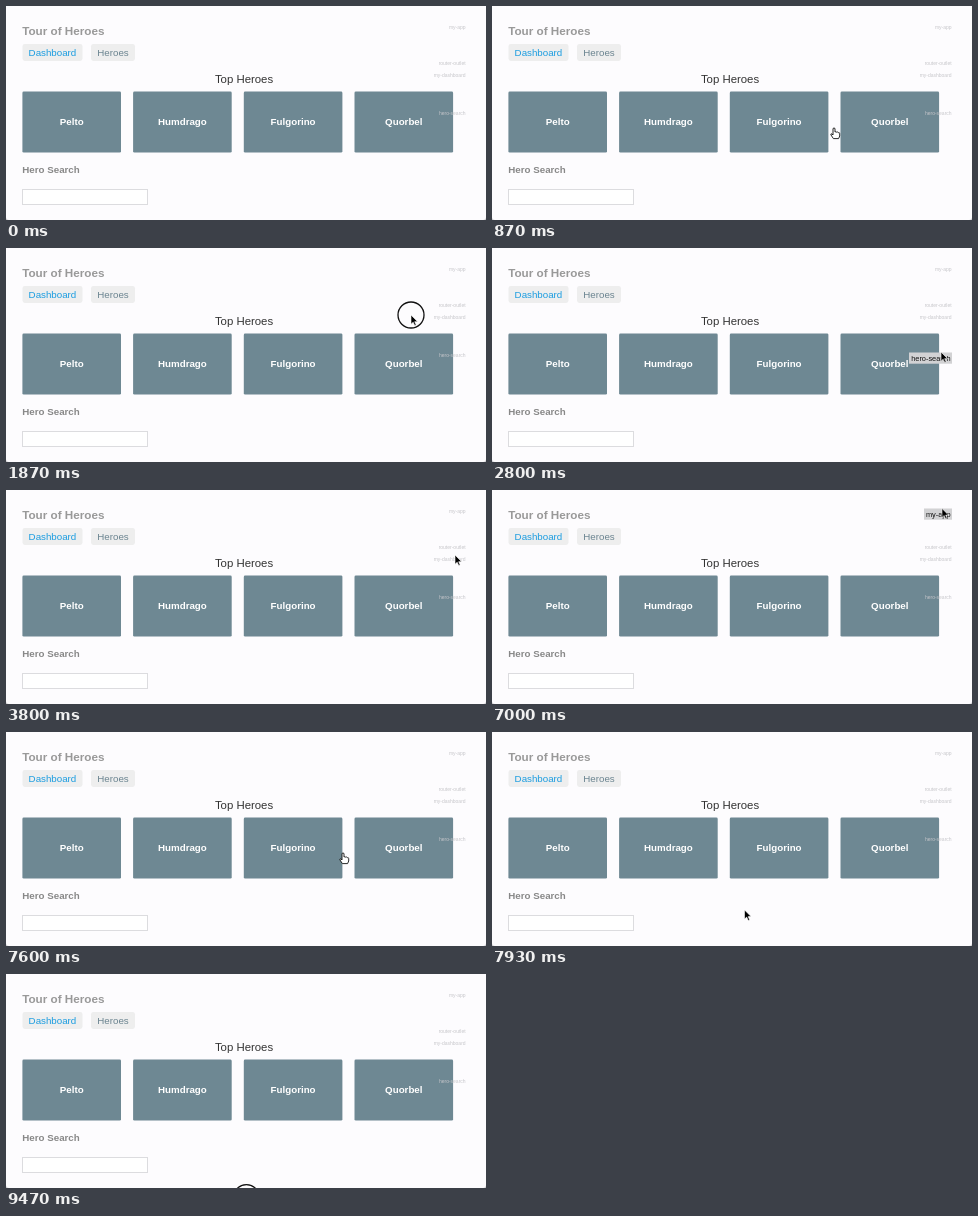
Animation, 480 px wide and 214 px high, one loop 9.54 s. Source, as an HTML page:

```html
<!DOCTYPE html>
<html lang="en">
<head>
<meta charset="utf-8">
<title>Tour of Heroes</title>
<style>
  html, body { margin: 0; width: 100%; height: 100%; overflow: hidden; background: #c4c4c8; }
  svg { display: block; width: 100%; height: 100%; font-family: "Liberation Sans", Arial, sans-serif; }
  text { white-space: pre; }
  .bold { font-weight: bold; }
  .body { font-size: 9.75px; }
  .tile rect { fill: #6e8893; }
  .tile text { fill: #fff; text-anchor: middle; }
  .tile.on rect { fill: #eee; }
  .tile.on text { fill: #607d8b; }
  .tag rect { fill: none; }
  .tag text { fill: #c6c6ca; font-size: 5px; text-anchor: end; }
  .tag.on rect { fill: #d2d2d4; }
  .tag.on text { fill: #111; font-size: 7.4px; }
</style>
</head>
<body>
<svg viewBox="0 0 480 214" preserveAspectRatio="none">
  <path d="M0 0H480V211Q480 214 477 214H3Q0 214 0 211Z" fill="#fdfcfe"/>
  <text class="bold" x="16.2" y="28.6" font-size="11.7" fill="#999">Tour of Heroes</text>
  <g fill="#eee">
    <rect x="16.5" y="38" width="60" height="17" rx="2.4"/>
    <rect x="85" y="38" width="44" height="17" rx="2.4"/>
  </g>
  <text class="body" x="22.6" y="49.6" fill="#1a9ce0">Dashboard</text>
  <text class="body" x="91.3" y="49.6" fill="#6b8490">Heroes</text>
  <text x="238" y="76.7" font-size="11.4" fill="#333" text-anchor="middle">Top Heroes</text>
  <g id="tiles"></g>
  <text class="bold body" x="16.3" y="167" fill="#888">Hero Search</text>
  <rect x="16.5" y="183.5" width="125" height="15" fill="#fff" stroke="#dcdcdf"/>
  <g id="tags"></g>
  <g id="pointer">
    <circle id="ring" r="13" fill="none" stroke="#111" stroke-width="1.3"/>
    <path id="arrow" d="M0 0V9.2L2.2 7.2 3.7 10.6 5.2 10 3.7 6.7H6.6Z" fill="#000" stroke="#fff" stroke-width=".6"/>
    <path id="hand" d="M-1 .5Q0-.6 1 .5V4Q2 3.3 2.7 4.2 3.8 3.6 4.3 4.6 5.6 4.3 5.7 5.6V8L4.6 10.6H-.6L-3 7Q-3.6 5.6-2.2 5.8L-1 7Z" fill="#fff" stroke="#111" stroke-width=".9"/>
    <path id="beam" d="M-2-4.5Q0-4.5 0-3.2 0-4.5 2-4.5M0-3.2V4.2M-1.2 1.6H1.2M-2 5.5Q0 5.5 0 4.2 0 5.5 2 5.5" fill="none" stroke="#222" stroke-width=".9"/>
  </g>
</svg>
<script>
const LOOP = 9540, FPS = 15;
const $ = id => document.getElementById(id);

function add(parent, name, attrs, text = "") {
  const el = document.createElementNS("http://www.w3.org/2000/svg", name);
  for (const key in attrs) el.setAttribute(key, attrs[key]);
  el.textContent = text;
  return parent.appendChild(el);
}

const tiles = ["Pelto", "Humdrago", "Fulgorino", "Quorbel"].map((name, i) => {
  const x = 16.4 + i * 110.7;
  const el = add($("tiles"), "g", { class: "tile" });
  add(el, "rect", { x, y: 85.6, width: 98.6, height: 61, rx: 1.3 });
  add(el, "text", { x: x + 49.3, y: 119.2, class: "bold body" }, name);
  return { el, x };
});

const tags = [["my-app", 18.5, 28], ["router-outlet", 55, 43], ["my-dashboard", 66.5, 48], ["hero-search", 104.5, 43]]
  .map(([name, y, width]) => {
    const el = add($("tags"), "g", { class: "tag" });
    add(el, "rect", { x: 460 - width, y, width, height: 11.2 });
    return { el, y, label: add(el, "text", {}, name) };
  });

const ease = {
  both: u => u * u * (3 - 2 * u),
  in: u => u * u,
  out: u => 1 - (1 - u) ** 2,
  line: u => u
};

// Pointer path: time, x, y, easing of the way there
const path = [
  [0, 242, 232], [66, 244, 183, "line"], [600, 342, 150, "in"], [1000, 342, 108, "line"],
  [1350, 344, 82, "line"], [1800, 405, 67, "out"], [2130, 405, 67], [2790, 449, 104, "both"],
  [3200, 449, 104], [3790, 449, 65, "both"], [4130, 449, 67, "both"], [4670, 449, 67],
  [5530, 447, 55.5, "both"], [6070, 447, 55.5], [7060, 450, 18, "both"], [7270, 450, 18],
  [7600, 337, 121, "in"], [8130, 239, 187, "out"], [8540, 239, 187], [8730, 240, 205, "both"],
  [8800, 240, 205], [9130, 240, 222, "both"], [LOOP, 240.5, 224, "line"]
];

function pointerAt(t) {
  const i = path.findIndex(p => p[0] > t);
  const [t0, x0, y0] = path[i - 1], [t1, x1, y1, kind = "line"] = path[i];
  const u = ease[kind]((t - t0) / (t1 - t0));
  return [x0 + (x1 - x0) * u, y0 + (y1 - y0) * u];
}

const within = (v, a, b) => v >= a && v < b;
const show = (id, on) => $(id).style.display = on ? "" : "none";

function draw(now) {
  const t = Math.floor((now % LOOP) * FPS / 1000 + 0.1) * 1000 / FPS % LOOP;
  const [x, y] = pointerAt(t);
  let onTag = false;
  for (const tag of tags) {
    const on = within(x, 433, 460) && within(y, tag.y - 1, tag.y + 6);
    onTag = onTag || on;
    tag.el.classList.toggle("on", on);
    tag.label.setAttribute("x", on ? 458.6 : 459.6);
    tag.label.setAttribute("y", tag.y + (on ? 8 : 4.2));
  }
  const inRow = within(y, 85.6, 146.6) && !onTag;
  for (const { el, x: left } of tiles) el.classList.toggle("on", inRow && within(x, left, left + 98.6));

  const beam = within(t, 4190, 4320) || within(t, 5860, 5925);
  const hand = inRow && within(x, 16, 447);
  show("beam", beam);
  show("hand", hand && !beam);
  show("arrow", !hand && !beam);
  show("ring", within(t, 1790, 1990) || t > 9390);
  $("pointer").setAttribute("transform", `translate(${x} ${y})`);
}

function tick() {
  draw(performance.now());
  requestAnimationFrame(tick);
}
tick();
</script>
</body>
</html>
```
